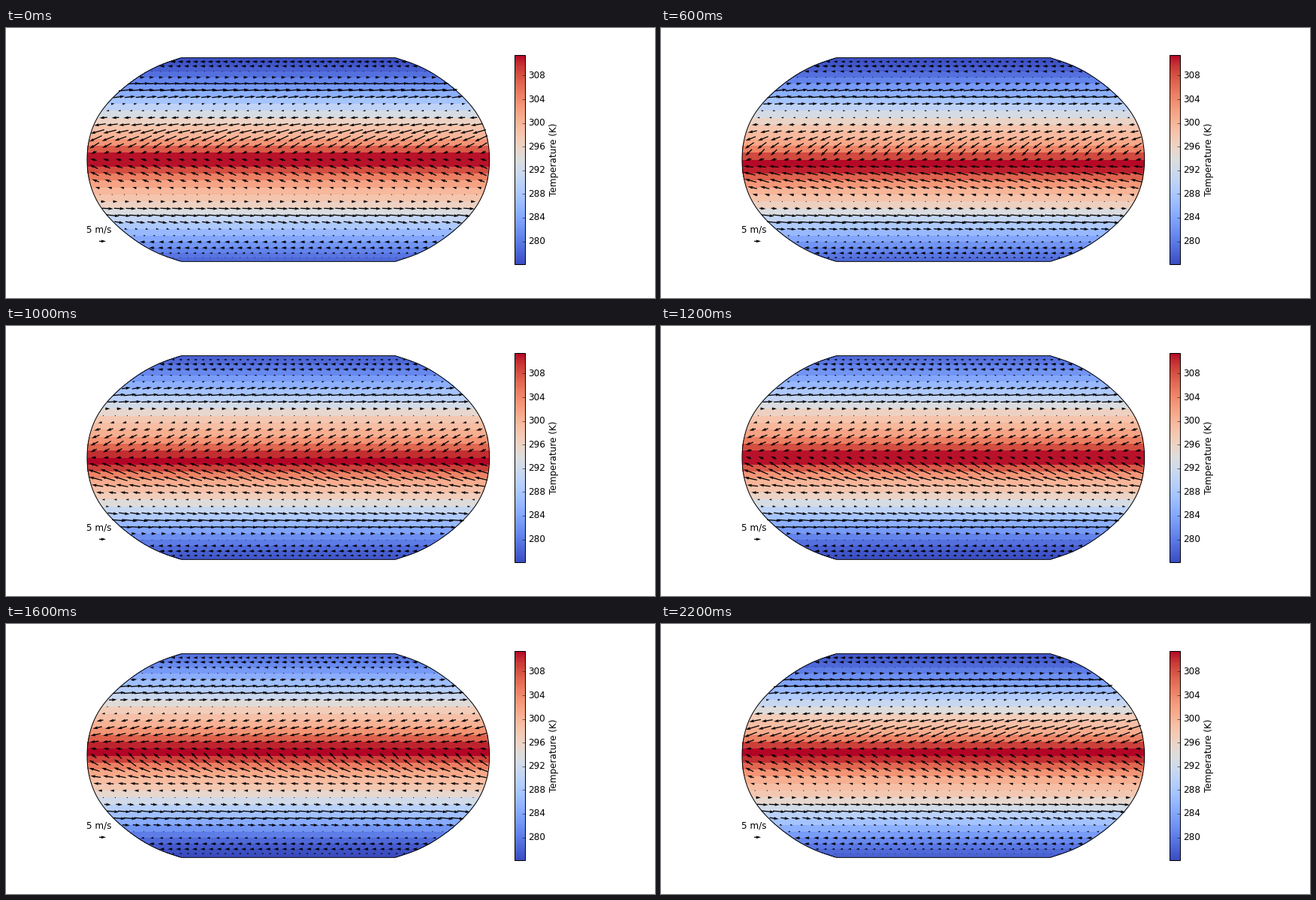
Animation, 864 px wide and 360 px high, one loop 2400 ms. Source, as a matplotlib script:

```python
import numpy as np
import matplotlib.pyplot as plt
from matplotlib.animation import FuncAnimation
from matplotlib.cm import ScalarMappable
from matplotlib.colors import Normalize

plt.rcParams.update({"font.family": "DejaVu Sans", "font.size": 12,
                     "ytick.alignment": "center"})

W, H, DPI = 864, 360, 72
FRAMES, INTERVAL = 12, 200
CX, CY, RX = 375.84, 175.5, 267.84
RY = RX * 0.5072
ROW_STEP = 5.537  # degrees between grid rows

# Robinson parallel lengths at a few latitudes, as an even polynomial
PARALLEL = np.polyfit((np.array([0, 25, 45, 60, 75, 85, 90]) / 90) ** 2,
                      [1, .973, .8962, .7986, .6732, .5722, .5322], 6)


def robinson(lon, lat):
    """Map lon in -1..1 and lat in degrees to stage pixels."""
    p = np.abs(lat) / 90
    x = CX + RX * lon * np.polyval(PARALLEL, p ** 2)
    y = CY - RY * np.sign(lat) * (1.116 * p - .116 * p ** 6.5)
    return x, y


def bell(x, center, width):
    return np.exp(-((x - center) / width) ** 2)


def cycle(month, peak):
    return np.cos(2 * np.pi * (month - peak) / FRAMES)


def temperature(lat, month):
    """Warm belt and polar cooling that follow the sun."""
    sun = cycle(month, 7.5 + 1.5 * bell(lat, 0, 20))
    d = np.abs(lat - 4.5 * sun)
    mean = 277.4 + 25.3 * np.cos(np.radians(d)) ** 2
    tropics = 8.8 * bell(d, 0, 12.5) + 1.2 * bell(d, 31, 7)
    return mean + tropics + 1.3 * np.sin(np.radians(lat)) ** 5 * sun


def zonal(lat, month):
    """Trades, westerly jet and polar easterlies, in pixels."""
    winter = np.sign(lat) * cycle(month, 11.3)
    q = np.abs(lat) - 3.5 * winter
    trades = (14.4 + 3.5 * winter) * bell(q, 15, 16.5)
    jet = (18.7 + 1.2 * winter) * bell(q, 49.5, 11)
    return jet - trades - 7.5 * bell(q, 75, 11)


def meridional(lat, month):
    """Flow into the convergence zone plus a poleward drift in the jets."""
    d = (lat - 6 * cycle(month, 9)) / 11
    cell = 6 * (1 - .4 * np.sign(lat) * cycle(month, 8))
    inflow = -cell * d * np.exp((1 - d ** 2) / 2)
    return inflow + 1.9 * np.sign(lat) * bell(np.abs(lat), 50, 9)


fig = plt.figure(figsize=(W / DPI, H / DPI), dpi=DPI, facecolor="white")
ax = fig.add_axes([0, 0, 1, 1])
ax.set_xlim(0, W)
ax.set_ylim(H, 0)
ax.axis("off")

norm = Normalize(276.14, 311.48)

# Temperature bands
edges = ROW_STEP * np.arange(-16, 17)
edges[[0, -1]] = -90, 90
bands = ROW_STEP * (np.arange(-16, 16) + .5)
mesh_x, mesh_y = robinson(*np.meshgrid([-1, 1], edges))
mesh = ax.pcolormesh(mesh_x, mesh_y, np.zeros((32, 1)), cmap="coolwarm",
                     norm=norm, shading="flat")

rim = np.linspace(-90, 90, 181)
rim_x, rim_y = robinson(np.repeat([-1, 1], 181), np.concatenate([rim, rim[::-1]]))
ax.fill(rim_x, rim_y, fill=False, edgecolor="black", linewidth=1, zorder=3)

# Wind arrows, drawn on the upper edge of the row they belong to
ARROW = dict(units="dots", scale_units="dots", scale=1, width=1.29, zorder=4)
cols = (np.arange(32) + .5) / 16 - 1
lon, lat = np.meshgrid(cols, edges[1:-1])
px, py = robinson(lon, lat)
wind = ax.quiver(px, py, np.zeros_like(px), np.zeros_like(px), pivot="mid", **ARROW)
ax.quiver([124.1], [284.3], [9], [0], pivot="tail", **ARROW)
ax.text(124.1, 276, "5 m/s", ha="center", va="bottom")

# Colour bar
cax = fig.add_axes([677.2 / W, .125, 13.95 / W, .775])
bar = fig.colorbar(ScalarMappable(norm, "coolwarm"), cax=cax,
                   ticks=np.arange(280, 309, 4))
bar.outline.set_linewidth(1)
cax.tick_params(direction="in", length=4, width=.5, pad=4)
ax.text(729, CY, "Temperature (K)", rotation=90, ha="center", va="center")


def draw(month):
    mesh.set_array(temperature(bands, month)[:, None])
    row = lat - ROW_STEP / 2
    ripple = np.cos(6 * np.pi * lon - 2 * np.pi * month / FRAMES)
    wind.set_UVC(zonal(row, month) * (1 + .04 * ripple),
                 meridional(row, month) * (1 + .2 * ripple))
    return mesh, wind


anim = FuncAnimation(fig, draw, frames=FRAMES, interval=INTERVAL,
                     repeat=True, repeat_delay=0, blit=False)
plt.show()
```
